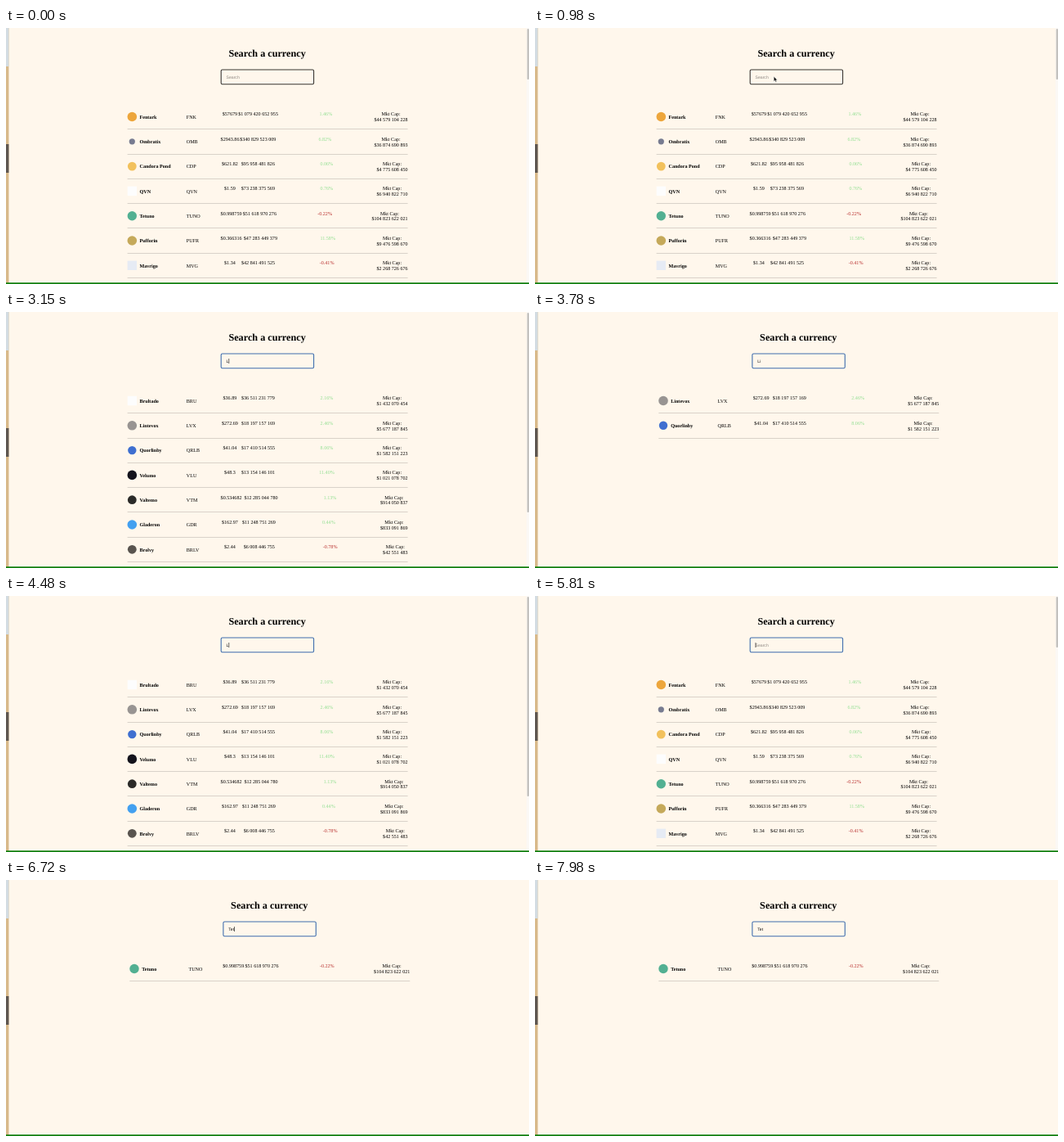
An HTML page for the animation above (8000 ms loop, 640 px wide and 313 px high).

```html
<!DOCTYPE html>
<html lang="en">
<head>
<meta charset="utf-8">
<title>Currency search</title>
<style>
html, body { margin: 0; width: 100%; height: 100%; overflow: hidden; background: #fff7ec; }
svg { display: block; width: 640px; height: 313px; }
text { font: 6.1px "Liberation Serif", serif; text-rendering: geometricPrecision; white-space: pre; }
.bold { font-weight: bold; }
.mid { text-anchor: middle; }
.title { font-size: 12.2px; }
#query { font: 5.1px "Liberation Sans", sans-serif; }
.up { fill: #92df92; }
.down { fill: #b8302f; }
</style>
</head>
<body>
<svg viewBox="0 0 640 313">
  <rect width="640" height="313" fill="#fff7ec"/>
  <g id="page">
    <text class="title bold mid" x="319.6" y="35.2">Search a currency</text>
    <rect id="box" x="263.2" y="51" width="113.4" height="17.8" rx="1.6" fill="none" stroke-width="1.1"/>
    <text id="query" x="269.6" y="61.8"></text>
    <rect id="caret" y="57" width=".6" height="6"/>
    <g id="list"></g>
  </g>
  <g id="bar">
    <rect x="637" width="3" height="311" fill="#fbf8f4"/>
    <rect id="thumb" x="637.7" y="1" width="2.3" rx="1.1" fill="#c3c1be"/>
  </g>
  <rect width="3.4" height="313" fill="#d8b98a"/>
  <rect width="3.4" height="47" fill="#d3dce2"/>
  <rect y="142" width="3.4" height="35" fill="#5e5650"/>
  <rect y="311.3" width="640" height="1.7" fill="#0a7d0a"/>
  <path id="cursor" d="M0 0V6l1.4-1.2 1 2.2 1-.4-1-2.2H4.2Z" fill="#111" stroke="#fff" stroke-width=".4"/>
</svg>
<script>
const $ = id => document.getElementById(id);
const LOOP = 8000, PITCH = 30.3, EM = 6.1;

// name, symbol, price, volume, volume x, change, change x, cap, colour, icon (radius, or 0 for a square)
const coins = [
  ['Fentark', 'FNK', '57679', '1 079 420 652 955', 284.2, 1.46, 383.5, '44 579 104 228', '#eda63c', 5.8],
  ['Ombratix', 'OMB', '2943.86', '340 829 523 009', 286.2, 6.82, 382.5, '36 874 690 893', '#777b90', 3.6],
  ['Candora Pond', 'CDP', '621.82', '95 958 481 826', 287.8, 0.06, 384.4, '4 775 608 450', '#f2c15c', 5.4],
  ['QVN', 'QVN', '1.59', '73 238 375 569', 287.8, 0.76, 384.4, '6 940 822 710', '#fdfdfd', 0],
  ['Tetuno', 'TUNO', '0.998759', '51 618 970 276', 289.8, -0.22, 381.2, '104 823 622 021', '#52b092', 5.7],
  ['Pufforin', 'PUFR', '0.366316', '47 283 449 379', 290.8, 11.58, 384.4, '9 476 598 670', '#c5a95a', 5.8],
  ['Mavrigo', 'MVG', '1.34', '42 841 491 525', 288, -0.41, 383.7, '2 268 726 676', '#e6ebf4', 0],
  ['Brultado', 'BRU', '36.89', '36 511 231 779', 288, 2.16, 384.6, '1 432 070 454', '#fdfdfd', 0],
  ['Lintevox', 'LVX', '272.69', '18 197 157 169', 288, 2.46, 384.6, '5 677 187 845', '#989492', 5.8],
  ['Quorlinby', 'QRLB', '41.04', '17 410 514 555', 288, 8.06, 384.6, '1 582 151 223', '#3f6fd0', 5.2],
  ['Velumo', 'VLU', '48.3', '13 154 146 101', 288, 11.4, 383.2, '1 021 078 702', '#14131c', 5.8],
  ['Valtemo', 'VTM', '0.534682', '12 285 044 780', 291.4, 1.13, 388.7, '914 050 837', '#2b2a28', 5.4],
  ['Gladeron', 'GDR', '162.97', '11 248 751 269', 289, 0.44, 387, '833 091 869', '#43a0f0', 5.8],
  ['Brolvy', 'BRLV', '2.44', '6 008 446 755', 290.7, -0.78, 387.7, '42 551 483', '#59544f', 5.4],
  ['Tenvo', 'TNVO', '16.54', '6 461 309 041', 290.5, -1.37, 386.7, '201 184 687', '#24324f', 5.8],
  ['Temiq', 'TMQ', '5.83', '4 492 208 321', 290.4, 4.51, 387.7, '201 250 714', '#4a86d0', 4.6]
];
const typing = [[0, ''], [2870, 'L'], [3220, 'Li'], [4480, 'L'], [4830, ''], [5880, 'T'], [6020, 'Te'], [6580, 'Tet']];
const blinks = [2170, 2660, 2870, 3780, 4270, 5320, 5810, 7070, 7560, 7910];
const thumbs = { '': 62, L: 244, T: 150 };
const FOCUS = 2170, HIDE = 2870;

const text = (x, y, s, cls = '') => `<text x="${x}" y="${y}" class="${cls}">${s}</text>`;
const width = s => [...s].reduce((w, c) => w + (/[ .]/.test(c) ? 0.25 : 0.5), 0) * EM;

function row([name, symbol, price, volume, vx, change, cx, cap, color, r], i) {
  const y = 108.5 + i * PITCH, low = y + 2.2, high = y - 1.2;
  price = '$' + price;
  cap = '$' + cap;
  const px = Math.max(273.9, 262.6 + width(price) / 2), mx = 491.6 - width(cap) / 2;
  const icon = r ? `<circle cx="154.3" cy="${y}" r="${r}" fill="${color}"/>`
    : `<rect x="148.6" y="${y - 5.7}" width="11.4" height="11.4" fill="${color}"/>`;
  return icon + text(163.5, low, name, 'bold') + text(220.8, low, symbol)
    + text(px, high, price, 'mid') + text(vx, high, '$' + volume)
    + text(cx, high, change.toFixed(2) + '%', change < 0 ? 'down' : 'up')
    + text(mx, high, 'Mkt Cap:', 'mid') + text(mx, high + 6.9, cap, 'mid')
    + `<rect x="148.6" y="${Math.round(y + 14.7)}" width="343" height="1" fill="#d9d2c9"/>`;
}

let shown = null;
function show(query) {
  if (query === shown) return;
  shown = query;
  const found = coins.filter(c => c[0].toLowerCase().includes(query.toLowerCase()));
  $('list').innerHTML = found.slice(0, 7).map(row).join('');
  $('query').textContent = query || 'Search';
  $('query').setAttribute('fill', query ? '#111' : '#8b8680');
  $('caret').setAttribute('x', 269.7 + (query ? $('query').getComputedTextLength() : 0));
  const thumb = thumbs[query];
  $('bar').style.display = thumb ? '' : 'none';
  $('thumb').setAttribute('height', thumb || 0);
  $('page').setAttribute('transform', `translate(${thumb ? 0 : 2.7} 0)`);
}

function frame(now) {
  const t = now % LOOP;
  show(typing.filter(k => k[0] <= t).pop()[1]);
  $('caret').style.display = blinks.filter(b => b <= t).length % 2 ? '' : 'none';
  $('box').setAttribute('stroke', t < FOCUS ? '#393633' : '#3f6eae');

  const left = 1 - Math.min(1, Math.max(0, (t - 70) / 840)), ease = left ** 3;
  $('cursor').setAttribute('transform', `translate(${292.3 - 298 * ease} ${59.3 + 150 * ease})`);
  $('cursor').style.display = t >= 70 && t < HIDE ? '' : 'none';
  requestAnimationFrame(frame);
}
requestAnimationFrame(frame);
</script>
</body>
</html>
```
